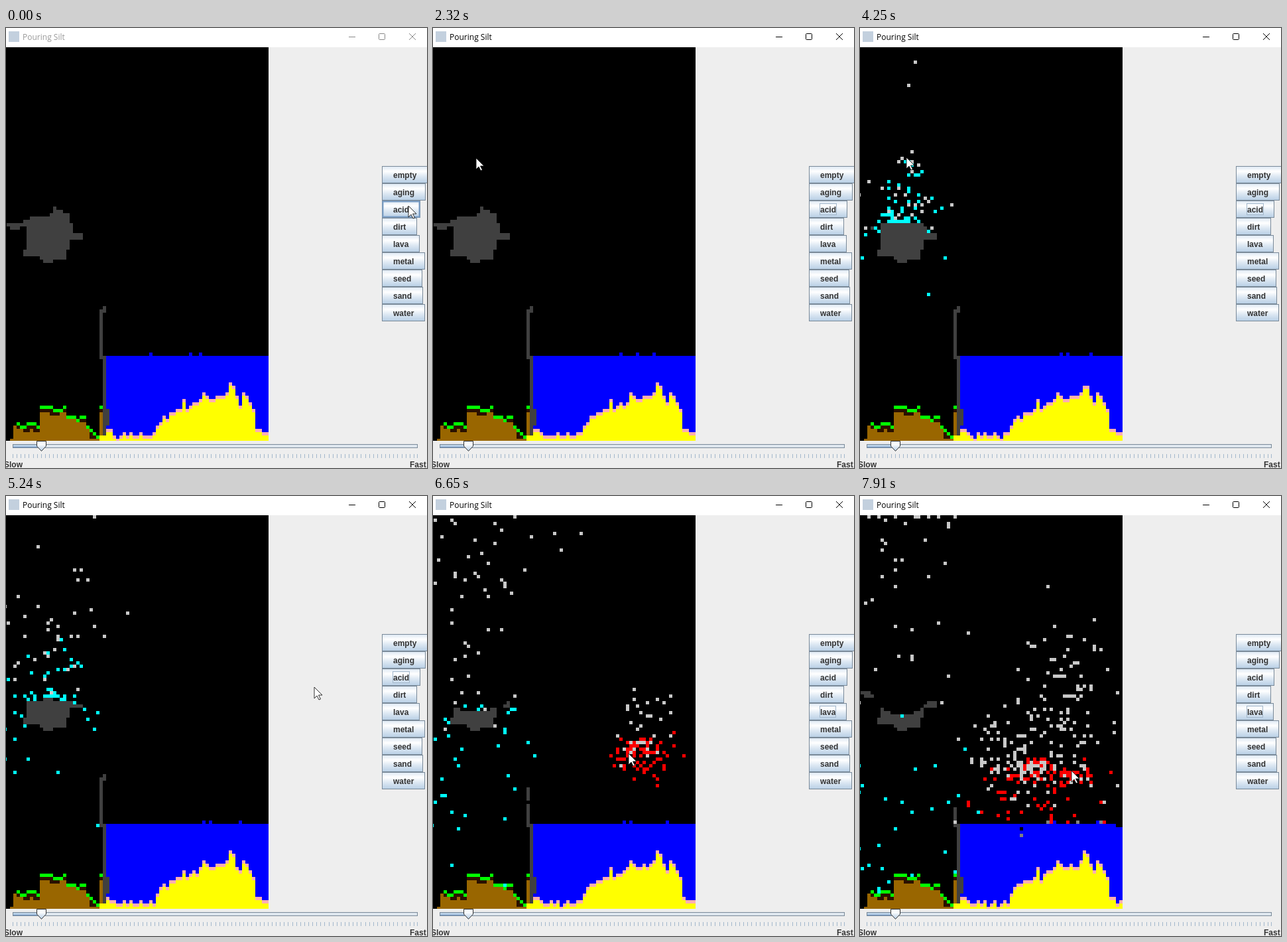
Recreate the animation shown at these times as an HTML page. Size 635 px wide and 663 px high, loop 8 s.

```html
<!DOCTYPE html>
<html lang="en">
<head>
<meta charset="utf-8">
<title>Pouring Silt</title>
<style>
  html, body { margin: 0; width: 100%; height: 100%; overflow: hidden; background: #eee; }
  svg { display: block; }
  .ui { font: bold 12px "Liberation Sans", Arial, sans-serif; fill: #333; }
  .title { font: 12px "Open Sans", "Noto Sans", sans-serif; }
  .crisp { shape-rendering: crispEdges; }
</style>
</head>
<body>
<svg width="635" height="663" viewBox="0 0 635 663">
  <defs>
    <linearGradient id="steel" x2="0" y2="1">
      <stop stop-color="#dde8f3"/><stop offset=".3" stop-color="#fff"/>
      <stop offset=".6" stop-color="#dde8f3"/><stop offset="1" stop-color="#b8cfe5"/>
    </linearGradient>
  </defs>
  <rect width="635" height="663" fill="#eee"/>
  <rect width="635" height="29" fill="#fff"/>
  <rect x="4" y="5" width="16" height="16" fill="#c3d0de"/>
  <text id="title" class="title" x="25" y="18">Pouring Silt</text>
  <g id="controls" fill="none">
    <path class="crisp" d="M517 13.5h10"/>
    <rect x="562.5" y="8.5" width="9" height="9" rx="1"/>
    <path d="M608 8l10 10M618 8l-10 10"/>
  </g>
  <svg id="field" class="crisp" y="29" width="396" height="593"><rect width="396" height="593"/></svg>
  <g id="buttons"></g>
  <rect id="hover" x="568.5" y="261.5" width="55" height="23" fill="none" stroke="#7a9fc8" stroke-width="2"/>
  <rect id="focus" class="crisp" x="583.5" height="17" fill="none" stroke="#a3b8cc"/>
  <g class="crisp">
    <rect x="10.5" y="627.5" width="610" height="5" fill="#dfe7ef" stroke="#7a8a99"/>
    <path d="M11 629.5h36" stroke="#b8cfe5" stroke-width="3"/>
    <path d="M11 631.5h36" stroke="#6f95c4"/>
    <path id="ticks" stroke="#a3b8cc"/>
  </g>
  <path d="M46.5 622.5h14v7.5l-7 7.5-7-7.5z" fill="url(#steel)" stroke="#333"/>
  <text class="ui" x="-3" y="662">Slow</text>
  <text class="ui" x="609" y="662">Fast</text>
  <path id="cursor" d="M0 0v17l4-4 3 6 2.500-1-3-6h5.500z" fill="#fff" stroke="#000" stroke-width=".8"/>
</svg>
<script>
const LOOP = 8000, STEPS = 58, COLS = 80, ROWS = 119, BOTTOM = ROWS - 1, SURFACE = 93;
const COLORS = {
  metal: '#404040', dirt: '#960', root: '#2a1000', plant: '#0f0', water: '#00f',
  sand: '#ff0', wet: '#ffafaf', gas: '#c8c8c8', acid: '#0ff', lava: '#f00', stone: '#808080'
};
const MOVES = { acid: 6, lava: 7, gas: 7, stone: 2 };

const $ = id => document.getElementById(id);
const add = (parent, tag, attrs, text = '') => {
  const el = document.createElementNS('http://www.w3.org/2000/svg', tag);
  for (const name in attrs) el.setAttribute(name, attrs[name]);
  el.textContent = text;
  return parent.appendChild(el);
};

let seed = 20;
const random = () => {
  seed = (seed + 0x6D2B79F5) | 0;
  let h = Math.imul(seed ^ seed >>> 15, 1 | seed);
  h = h + Math.imul(h ^ h >>> 7, 61 | h) ^ h;
  return ((h ^ h >>> 14) >>> 0) / 4294967296;
};
const chance = p => random() < p;
const spread = n => Math.round((random() + random() - 1) * n);
const noise = (a, b) => Math.abs(Math.sin(a * 12.9 + b * 78.2) * 43758.5) % 1;

// Linear interpolation through [position, ...values] points.
function track(points, at) {
  const next = points.findIndex(p => p[0] >= at);
  if (next < 0) return points[points.length - 1].slice(1);
  if (next === 0) return points[0].slice(1);
  const a = points[next - 1], b = points[next], f = (at - a[0]) / (b[0] - a[0]);
  return a.slice(1).map((v, i) => v + (b[i + 1] - v) * f);
}

// [step, x, y]
const pointer = [
  [2, 607, 268], [8, 70, 178], [16, 67, 180], [19, 62, 228], [23, 69, 237], [31, 70, 195],
  [35, 75, 198], [39, 595, 318], [41, 600, 318], [44, 306, 327], [47, 320, 385],
  [52, 197, 400], [57, 319, 414]
];
// [row, left column, right column]
const lump = [[48, 15, 15], [50, 14, 19], [51, 8, 19], [52, 6, 19], [54, 7, 20],
  [59, 7, 19], [62, 6, 18], [63, 11, 18], [64, 12, 14]];
// [step, row at the middle, bend towards the sides]
const erosion = [[18, 47, 0], [23, 51, .8], [31, 52.5, .6], [44, 58, .4], [52, 60.5, -2]];
// [column, top row]
const soil = [[2, 118], [3, 114], [7, 115], [10, 115], [11, 110], [18, 110], [19, 112], [24, 113], [26, 117], [28, 118]];
const dune = [[31, 115], [35, 117], [45, 116], [47, 111.5], [53, 109], [54, 106], [55, 108.5], [58, 107],
  [60, 104.5], [63, 106], [67, 104], [68, 101], [71, 106.5], [72, 103.5], [75, 109], [76, 115], [79, 116]];
// [step, three columns]
const ripples = [[0, 44, 56, 59], [23, 62, 64, 70], [57, 57, 59, 72]];

const soilTop = c => Math.round(track(soil, c)[0]);
const duneTop = c => Math.min(117, Math.round(track(dune, c)[0] + noise(c, 3) - .5));

function terrain(step, boiled) {
  const grid = Array(COLS * ROWS).fill('');
  const fill = (kind, left, right, top, bottom = top) => {
    for (let r = top; r <= bottom; r++)
      for (let c = left; c <= right; c++) grid[r * COLS + c] = kind;
  };

  for (let r = 48; r <= 64; r++) fill('metal', ...track(lump, r).map(Math.round), r);
  fill('metal', 1, 6, 53);
  fill('metal', 2, 4, 54);
  fill('metal', 20, 23, 56, 57);
  const [middle, bend] = track(erosion, step);
  for (let c = 0; c < 24; c++) fill('', c, c, 48, Math.round(middle + bend * ((c - 13) / 5) ** 2) - 1);

  const wallTop = Math.round(track([[41, 78], [52, 85], [57, 88]], step)[0]);
  fill('metal', 29, 29, Math.max(79, wallTop), SURFACE);
  if (step < 48) fill('metal', 30, 30, wallTop > 78 ? 79 : 78, 79);
  if (wallTop > 78) fill('', 29, 29, wallTop + 4);
  fill('metal', 30, 30, SURFACE, 116);

  for (let c = 2; c < 29; c++) {
    const top = soilTop(c), stem = noise(c, 1) < .5 ? 2 : 1;
    fill('dirt', c, c, top, BOTTOM);
    if (c < 4) continue;
    fill('root', c, c, top - stem + 1, top - (noise(c, 2) < .6 ? 1 : 0));
    fill('plant', c, c, top - stem);
  }
  fill('dirt', 29, 29, 110, 116);
  fill('root', 29, 29, 109);
  fill('plant', 29, 29, 108);
  fill('sand', 29, 30, 117, BOTTOM);

  for (let c = 31; c < COLS; c++) {
    const top = duneTop(c) + (noise(c, step) < .1 ? 1 : 0);
    fill('water', c, c, SURFACE + (c >= COLS - boiled ? 1 : 0), BOTTOM);
    fill('sand', c, c, top, BOTTOM);
    fill('wet', c, c, top);
  }
  fill('metal', 31, 31, 109, 113);
  for (const c of track(ripples, step).map(Math.round)) fill('water', c, c, SURFACE - 1);
  return grid;
}

let grains = [], boiled = 0;

function spawn(step, kind, count, dx, dy) {
  const [x, y] = track(pointer, step);
  for (let i = 0; i < count; i++)
    grains.push({ kind, c: Math.round((x + 4) / 5) + spread(dx), r: Math.round((y - 29) / 5) + spread(dy) });
}

function react(grain, below) {
  if (grain.kind === 'acid' && chance(below === 'metal' ? .3 : .02)) grain.kind = 'gas';
  if (grain.kind !== 'lava') return;
  if (below === 'water' || below === 'stone') {
    boiled = Math.min(40, boiled + 1);
    if (chance(.5)) grain.kind = chance(.6) ? 'stone' : 'gas';
  } else if (chance(.18)) grain.kind = 'gas';
}

function advance(grid, step) {
  const at = (c, r) => c < 0 || c >= COLS || r < 0 || r >= ROWS ? 'edge' : grid[r * COLS + c];
  const set = (g, kind) => { grid[g.r * COLS + g.c] = kind; };

  if (step >= 19 && step < 24) spawn(step, 'acid', 9, 5, 1);
  if (step >= 24 && step < 34) spawn(step, 'acid', 4, 1, 1);
  if (step >= 45) spawn(step, 'lava', 23, 6, 4);

  grains = grains.filter(g => !(g.kind === 'gas' && g.r === 0 && chance(.35)));
  for (const g of grains) set(g, g.kind);
  for (const g of grains) {
    react(g, at(g.c, g.r + 1));
    set(g, '');
    const sinks = g.kind === 'stone';
    for (let i = 0; i < MOVES[g.kind]; i++) {
      const dir = Math.floor(random() * 3);
      const c = g.c + (dir && !sinks ? dir * 2 - 3 : 0);
      const r = g.r + (dir ? 0 : g.kind === 'gas' ? -1 : 1);
      const target = at(c, r);
      if (target === '' || (sinks && target === 'water' && r < SURFACE + 4)) Object.assign(g, { c, r });
    }
    set(g, g.kind);
  }
}

function outlines(grid) {
  const paths = {};
  for (let r = 0; r < ROWS; r++)
    for (let c = 0, end; c < COLS; c = end) {
      const kind = grid[r * COLS + c];
      for (end = c + 1; end < COLS && grid[r * COLS + end] === kind;) end++;
      if (kind) paths[kind] = (paths[kind] || '') + `M${c * 5 - 4} ${r * 5}h${(end - c) * 5}v5H${c * 5 - 4}z`;
    }
  return paths;
}

const pictures = Array.from({ length: STEPS }, (_, step) => {
  const grid = terrain(step, boiled);
  advance(grid, step);
  return outlines(grid);
});

const layers = {};
for (const kind in COLORS) layers[kind] = add($('field'), 'path', { fill: COLORS[kind] });

['empty', 'aging', 'acid', 'dirt', 'lava', 'metal', 'seed', 'sand', 'water'].forEach((name, i) => {
  const y = 208 + i * 26;
  const box = add($('buttons'), 'rect', { x: 567.5, y: y + .5, height: 25, fill: 'url(#steel)', stroke: '#7a8a99' });
  const label = add($('buttons'), 'text', { class: 'ui', x: 584, y: y + 18 }, name);
  box.setAttribute('width', Math.round(label.getComputedTextLength()) + 33);
});
$('ticks').setAttribute('d', Array.from({ length: 101 }, (_, i) => `M${Math.min(620, 10 + Math.round(i * 6.11)) + .5} 642v6`).join(''));

let shown = -1;
function draw(time) {
  const step = Math.min(STEPS - 1, Math.floor((time % LOOP + 45) / 138));
  if (step === shown) return;
  shown = step;
  for (const kind in layers) layers[kind].setAttribute('d', pictures[step][kind] || '');
  $('cursor').setAttribute('transform', `translate(${track(pointer, step).map(Math.round)})`);
  const active = step >= 2, lava = step >= 41;
  $('title').setAttribute('fill', active ? '#000' : '#999');
  $('controls').setAttribute('stroke', active ? '#000' : '#888');
  $('hover').setAttribute('visibility', active ? 'hidden' : 'visible');
  $('focus').setAttribute('visibility', active ? 'visible' : 'hidden');
  $('focus').setAttribute('y', lava ? 316.5 : 264.5);
  $('focus').setAttribute('width', lava ? 24 : 25);
}
const start = performance.now();
function tick() {
  draw(performance.now() - start);
  requestAnimationFrame(tick);
}
tick();
</script>
</body>
</html>
```
